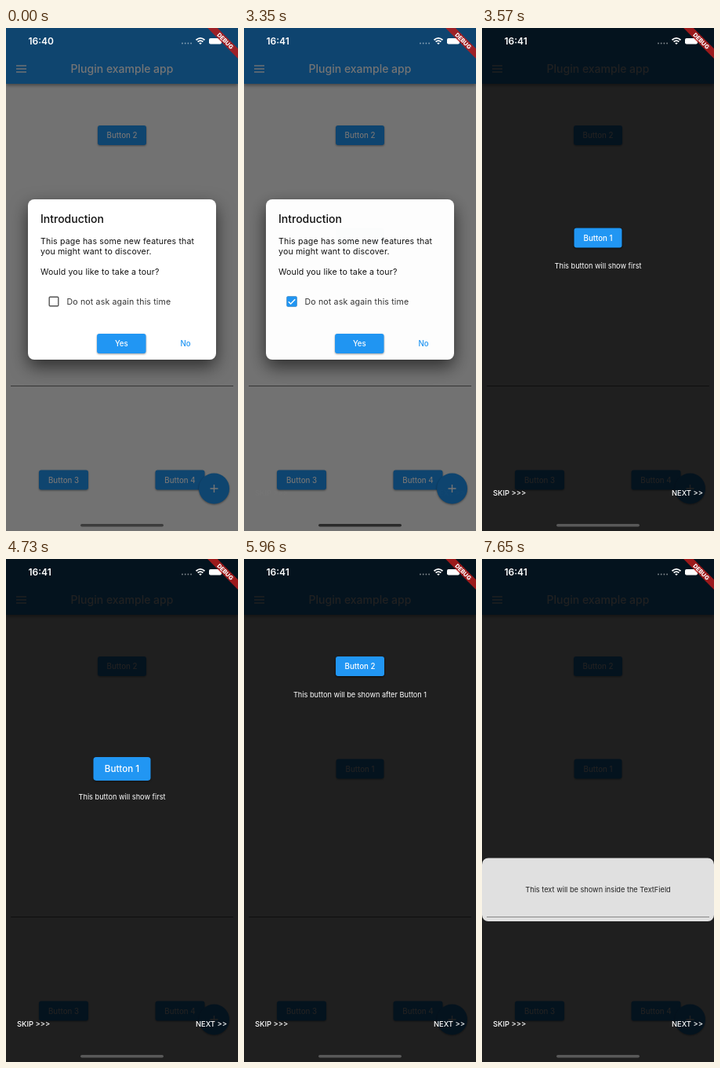
Animation, 296 px wide and 640 px high, one loop 8000 ms. Source, as an HTML page:

```html
<!DOCTYPE html>
<html lang="en">
<head>
<meta charset="utf-8">
<title>Feature tour</title>
<style>
  html, body { margin: 0; width: 100%; height: 100%; overflow: hidden; background: #000; }
  svg { display: block; width: 296px; height: 640px; }
  text { font-family: Inter, "Open Sans", sans-serif; fill: #fff; white-space: pre; }
  .mid { text-anchor: middle; }
  .btn text { font-size: 9.7px; font-weight: 500; }
  .btn rect, .fab { fill: #2196f3; filter: drop-shadow(0 1px 1px #0006); }
  .body text { font-size: 10.6px; letter-spacing: .15px; fill: #111; }
  .tip { font-size: 9.2px; }
  .nav text { font-size: 9.4px; font-weight: 500; }
</style>
</head>
<body>
<svg id="stage" viewBox="0 0 296 640"></svg>
<script>
const BLUE = '#2196f3';
const $ = id => document.getElementById(id);

const button = (cx, cy, w, label) => `<g class="btn mid">
  <rect x="${cx - w / 2}" y="${cy - 12.5}" width="${w}" height="25" rx="3"/>
  <text x="${cx}" y="${cy + 3.5}">${label}</text></g>`;

const bars = (x, ys, w) => ys.map(y => `<path d="M${x} ${y}h${w}"/>`).join('');

const app = `
  <rect width="296" height="640" fill="#fafafa"/>
  <rect width="296" height="71" fill="${BLUE}" style="filter:drop-shadow(0 2px 2px #0006)"/>
  <g stroke="#fff" stroke-width="1.4">${bars(13, [48, 52, 56], 13)}</g>
  <text class="mid" x="148" y="57" font-size="14" font-weight="500">Plugin example app</text>
  ${button(148, 136.5, 62, 'Button 2')}
  ${button(148, 267, 61, 'Button 1')}
  ${button(73.5, 575, 63, 'Button 3')}
  ${button(222, 575, 63, 'Button 4')}
  <path d="M6 455.5H290" stroke="#777"/>
  <circle class="fab" cx="265.5" cy="586" r="19.5"/>
  <path d="M260.5 586h10m-5-5v10" stroke="#fff" stroke-width="1.4"/>`;

const dialog = `
  <rect width="296" height="640" opacity=".54"/>
  <rect x="28" y="218" width="240" height="204" rx="8" fill="#fff"
    style="filter:drop-shadow(0 9px 11px #0009)"/>
  <text x="44" y="248" font-size="14" font-weight="500" style="fill:#111">Introduction</text>
  <g class="body">
    <text x="44" y="275">This page has some new features that</text>
    <text x="44" y="288">you might want to discover.</text>
    <text x="44" y="314">Would you like to take a tour?</text>
    <text x="77.5" y="351.5" style="fill:#333">Do not ask again this time</text>
  </g>
  <rect x="55.2" y="342.2" width="11.6" height="11.6" rx="1" fill="none" stroke="#555" stroke-width="1.4"/>
  <rect id="fill" x="54.5" y="341.5" width="13" height="13" rx="1" fill="${BLUE}"/>
  <path id="tick" d="M56.8 348.2l2.8 2.8 5.6-5.7" pathLength="1" stroke-dasharray="1 2"
    fill="none" stroke="#fff" stroke-width="1.5"/>
  ${button(147.3, 401.5, 62.5, 'Yes')}
  <text class="mid" x="229" y="405" font-size="9.7" font-weight="500" style="fill:${BLUE}">No</text>`;

const tour = `
  <rect width="296" height="640" opacity=".876"/>
  <g class="nav">
    <text x="14" y="595">SKIP &gt;&gt;&gt;</text>
    <text x="282" y="595" text-anchor="end">NEXT &gt;&gt;</text>
  </g>`;

const step = (i, content, tip, y, fill = '#fff') => `<g id="step${i}">${content}
  <text class="tip mid" x="148" y="${y}" style="fill:${fill}">${tip}</text></g>`;

const steps =
  step(1, `<g id="zoom1">${button(148, 267, 61, 'Button 1')}</g>`,
    'This button will show first', 306) +
  step(2, `<g id="zoom2">${button(148, 136.5, 62, 'Button 2')}</g>`,
    'This button will be shown after Button 1', 175.5) +
  step(3, `<rect y="380.5" width="296" height="80.5" rx="8" fill="#e0e0e0"/>
    <path d="M6 455.5H290" stroke="#888"/>`,
    'This text will be shown inside the TextField', 423.5, '#222');

const system = `
  <text id="clock" x="28.5" y="21" font-size="12" font-weight="600"></text>
  <path d="M225 19.5h13" stroke="#fff" stroke-opacity=".5" stroke-width="1.8"
    stroke-dasharray="0 3.7" stroke-linecap="round"/>
  <g fill="none" stroke="#fff" stroke-width="1.8">
    <path d="M242.5 15.2q5.5-4.6 11 0M244.6 17.5q3.4-2.8 6.8 0"/>
  </g>
  <path d="M246.2 19.2q1.8-1.4 3.6 0L248 21z" fill="#fff"/>
  <rect x="259" y="13" width="16" height="7.5" rx="2" fill="#fff"/>
  <rect id="home" x="95" y="631" width="106" height="3.6" rx="1.8"/>
  <g transform="translate(296 0) rotate(45)">
    <rect x="-40" y="18.5" width="80" height="9" fill="#b71c1c" opacity=".85"/>
    <text class="mid" y="25.8" font-size="7.4" font-weight="800">DEBUG</text>
  </g>`;

$('stage').innerHTML = `${app}<g id="dialog">${dialog}</g><g id="tour">${tour}</g>${steps}${system}`;

const ramp = (t, a, b) => Math.min(1, Math.max(0, (t - a) / (b - a)));
const set = (id, name, value) => $(id).setAttribute(name, value);
const show = (id, opacity) => set(id, 'opacity', opacity);

// Grows by a fifth and back, 600 ms each way, with a decelerating curve.
function pulse(t, start) {
  if (t < start) return 1;
  const phase = (t - start) / 600 % 2;
  const p = phase < 1 ? phase : 2 - phase;
  return 1 + .2 * (1 - (1 - p) ** 2);
}

function zoom(id, cy, k) {
  set(id, 'transform', `translate(148 ${cy}) scale(${k}) translate(-148 ${-cy})`);
}

function draw(t) {
  const open = ramp(t, 3350, 3570);
  const second = ramp(t, 5770, 5960);
  const third = ramp(t, 7330, 7650);
  show('fill', ramp(t, 450, 580));
  show('tick', t < 560 ? 0 : 1);
  set('tick', 'stroke-dashoffset', 1 - ramp(t, 560, 700));
  show('dialog', 1 - open);
  show('tour', open);
  show('step1', open * (1 - second));
  show('step2', second * (1 - third));
  show('step3', third);
  zoom('zoom1', 267, pulse(t, 4060));
  zoom('zoom2', 136.5, pulse(t, 6450));
  $('clock').textContent = t < 3350 ? '16:40' : '16:41';
  set('home', 'fill', t < 3350 ? '#3c3c3c' : t < 3460 ? '#2a2a2a' : '#585858');
}

const begin = performance.now();
function tick() {
  draw((performance.now() - begin) % 8000);
  requestAnimationFrame(tick);
}
tick();
</script>
</body>
</html>
```
